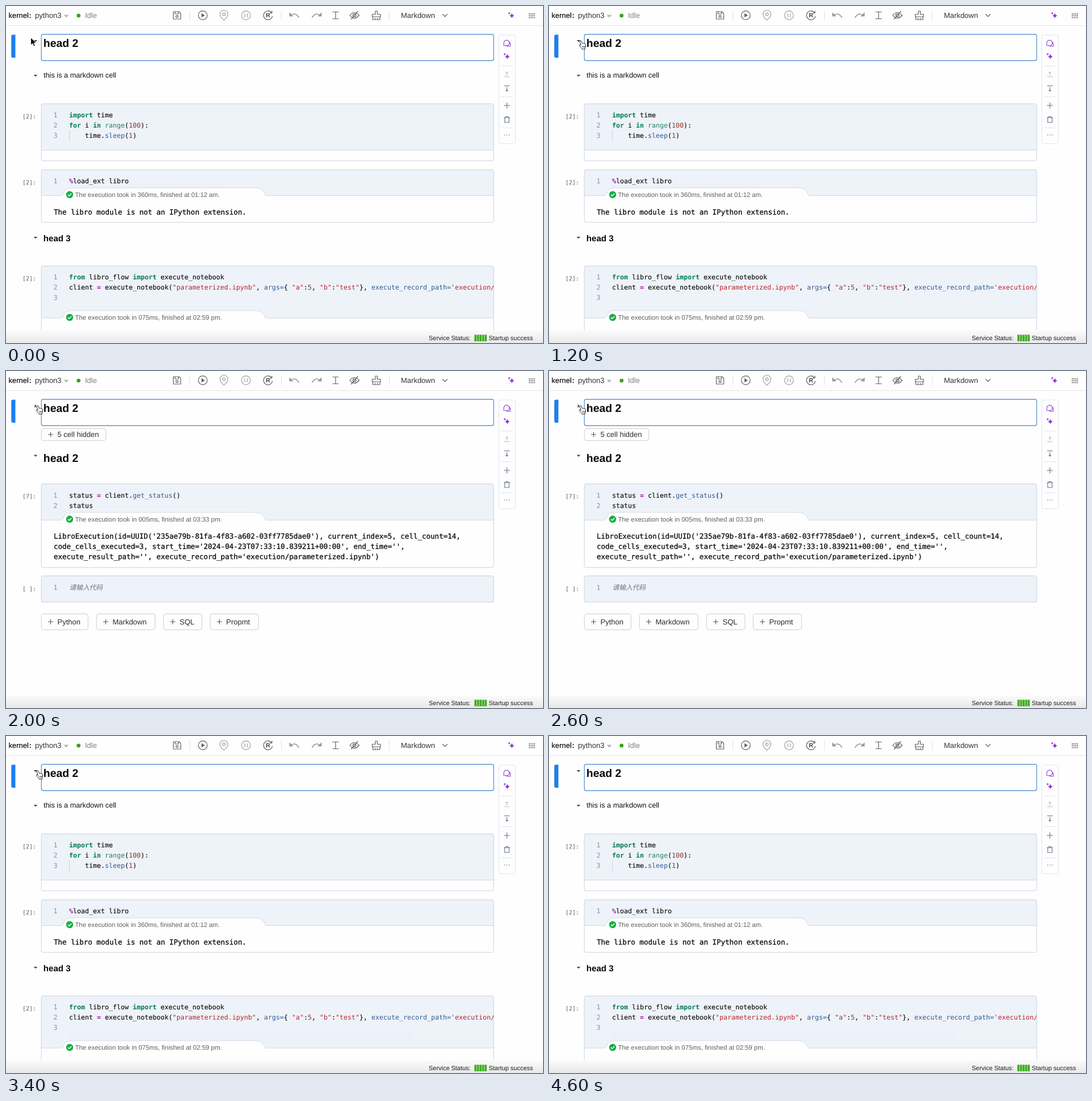
Recreate the animation shown at these times as an HTML page. Size 945x593 px, loop 4.8 s.

```html
<!DOCTYPE html>
<html lang="en">
<head>
<meta charset="utf-8">
<title>Notebook cell folding</title>
<style>
html, body { margin: 0; width: 100%; height: 100%; overflow: hidden; background: #fefefe; }
svg { display: block; width: 945px; height: 593px; }
text {
  white-space: pre; font-family: "Liberation Sans", Arial, sans-serif;
  text-rendering: geometricPrecision;
}
.mono { font-family: "DejaVu Sans Mono", monospace; }
.output { stroke: #0c0c0c; stroke-width: .3; }
.code { stroke: #0c0c0c; stroke-width: .12; }
.code tspan { stroke: none; }
.kw { fill: #007a58; font-weight: bold; }
.builtin { fill: #27806c; }
.num { fill: #8e3528; }
.prop { fill: #2c5f95; }
.op { fill: #a5129f; font-weight: bold; }
.str { fill: #bd2430; }
.icon { fill: none; stroke: #626262; stroke-width: 1.2; stroke-linecap: round; stroke-linejoin: round; }
.dim { stroke: #a0a0a0; }
.side { stroke: #63718c; stroke-width: 1.1; }
.pale { stroke: #b9bec9; }
.chat { stroke: #9138d6; stroke-width: 1.1; }
</style>
</head>
<body>
<svg id="stage" viewBox="0 0 945 593" xmlns="http://www.w3.org/2000/svg"></svg>
<script>
const LOOP = 4800;
const STEP = 200;
const PURPLE = '#9138d6';
const LEFT = 62.2, RIGHT = 858.2;

const text = (x, y, size, str, fill = '#111', extra = '') =>
  `<text x="${x}" y="${y}" font-size="${size}" fill="${fill}" ${extra}>${str}</text>`;
const mono = (x, y, size, str, fill = '#0c0c0c', cls = '') =>
  text(x, y, size, str, fill, `class="mono ${cls}"`);
const path = (d, fill = 'none', extra = '') => `<path d="${d}" fill="${fill}" ${extra}/>`;
const icon = (d, cls = '') => `<path class="icon ${cls}" d="${d}"/>`;
const rect = (x, y, w, h, fill, extra = '') =>
  `<rect x="${x}" y="${y}" width="${w}" height="${h}" fill="${fill}" ${extra}/>`;
const circle = (x, y, r, fill, extra = '') =>
  `<circle cx="${x}" cy="${y}" r="${r}" fill="${fill}" ${extra}/>`;
const span = (cls, str) => `<tspan class="${cls}">${str}</tspan>`;
const kw = s => span('kw', s), op = s => span('op', s), str = s => span('str', s);
const num = s => span('num', s), prop = s => span('prop', s);

const star = (x, y, r) => {
  const k = r * 0.18;
  return path(`M${x} ${y - r}Q${x + k} ${y - k} ${x + r} ${y}Q${x + k} ${y + k} ${x} ${y + r}` +
    `Q${x - k} ${y + k} ${x - r} ${y}Q${x - k} ${y - k} ${x} ${y - r}Z`, PURPLE);
};
const sparkles = (x, y) => star(x + 1.2, y + 1, 4.8) + star(x - 3.4, y - 3.2, 2.4);
const ring = (x, cls = '') => circle(x, 16.4, 7.8, 'none', `class="icon ${cls}"`);
const foldDown = y => path(`M48.8 ${y}h6.4l-3.2 3.4z`, '#4a4a4a');
const foldRight = y => path(`M50.6 ${y - 2}v6.4l3.4-3.2z`, '#4a4a4a');
const label = (y, str) => mono(29, y, 10, str, '#545d6b');
const heading = (y, size, str) => text(65.8, y, size, str, '#080808', 'font-weight="bold"');
const plus = (x, y) => path(`M${x - 4.5} ${y}h9M${x} ${y - 4.5}v9`, 'none', 'stroke="#555" stroke-width="1.1"');

// Numbered code lines, 18px apart.
const code = (y, lines) => lines.map((line, i) =>
  mono(83.5, y + i * 18, 11.63, i + 1, '#8790a0') +
  mono(111, y + i * 18, 11.63, line, '#0c0c0c', 'code')).join('');

// A cell with a shaded input part down to `split`.
const cell = (top, split, bottom) => {
  const frame = [LEFT, top, RIGHT - LEFT, bottom - top];
  return rect(...frame, '#fefefe', 'rx="3"') +
    path(`M${LEFT} ${split}V${top + 3}q0-3 3-3H${RIGHT - 3}q3 0 3 3V${split}z`, '#eef2f9') +
    path(`M${LEFT} ${split}H${RIGHT}`, 'none', 'stroke="#cfd6e3"') +
    rect(...frame, 'none', 'rx="3" stroke="#ccd2df"');
};

const timing = (y, size, str) => {
  const tab = `M98 ${y + 1}q3-2 4-5.5q3-8 12-8H438q12 0 16 8q2 4 3 5.5`;
  return path(tab + 'v1.5H98z', '#fefefe') + path(tab, 'none', 'stroke="#d3d9e5"') +
    circle(112, y - .5, 6.2, '#17ae48') +
    path(`M109 ${y - .5}l2.2 2.3l4-4.3`, 'none', 'stroke="#fff" stroke-width="1.4"') +
    text(121.5, y + 3.2, size, str, '#5f5f5f');
};

const button = (x, y, w, h, str) =>
  rect(x + .3, y + .3, w, h, '#fefefe', 'rx="4" stroke="#cdcdcd"') +
  plus(x + 16.5, y + h / 2 + .3) + text(x + 28.5, y + h / 2 + 4.7, 13, str, '#2c2c2c');

const toolbar = () =>
  path('M0 34.5H945', 'none', 'stroke="#e4e4e4"') +
  text(4.5, 21, 13, 'kernel', '#111', 'stroke="#111" stroke-width=".2"') +
  text(40.5, 21, 13, ':', '#111', 'font-weight="bold"') +
  text(51, 21, 13.1, 'python3', '#333') +
  path('M101.5 15.5h9l-4.5 5z', '#b9b9b9') + circle(127.7, 16.8, 3.4, '#3aa318') +
  text(139, 21, 13, 'Idle', '#808080') +
  [323.5, 484.5, 674.5].map(x => path(`M${x} 8.5v17`, 'none', 'stroke="#e2e2e2"')).join('') +
  icon('M294.5 10h10l3 3v10h-13zM297.5 10v4h6v-4') + circle(301, 18.5, 1.9, 'none', 'class="icon"') +
  ring(346.3) + path('M344 12.8l6 3.6l-6 3.6z', '#626262') +
  icon('M383.5 25q-7-6-7-10.5a7 7 0 0 1 14 0q0 4.5-7 10.5z', 'dim') +
  circle(383.5, 14.5, 2.3, 'none', 'class="icon dim"') +
  ring(422.3, 'dim') + icon('M420.2 13.5v6M424.5 13.5v6', 'dim') +
  icon('M467.5 12a7.8 7.8 0 1 0 1.2 6M468 8.8v3.5h-3.5') +
  text(457.2, 20.3, 10.5, 'R', '#444', 'font-weight="bold"') +
  path('M498.5 11v7.2h7.2z', '#999') + path('M501 16.5q8.500-6.500 14.500 4', 'none', 'stroke="#999" stroke-width="1.7"') +
  path('M555.5 11v7.2h-7.2z', '#999') + path('M553 16.5q-8.500-6.500-14.500 4', 'none', 'stroke="#999" stroke-width="1.7"') +
  icon('M575 10.5h10M575 22.5h10M580 10.5v12') +
  icon('M605 16.5q8-10 16.5 0q-8.5 10-16.5 0zM607.5 23l11.5-13.5') +
  circle(613.2, 16.5, 2.7, 'none', 'class="icon"') +
  icon('M650 14.500V9h3.500v5.500h5.500v4.500h-14.500v-4.500zM645.500 19v5h12.500v-5M649.500 24v-2.500M653.800 24v-2.500') +
  text(695, 21, 13, 'Markdown', '#333') + icon('M768.5 14.5l4 4l4-4') +
  sparkles(889, 16) +
  [0, 1, 2].map(r => [0, 1, 2, 3].map(c =>
    rect(920 + c * 3, 13 + r * 3.3, 1.9, 1.7, '#666')).join('')).join('');

const sidebar = () =>
  rect(867.3, 51, 29.2, 191.3, '#fefefe', 'rx="3" stroke="#e1e4eb"') +
  icon('M876 69.5v-4.500a4.900 4.900 0 1 1 4.900 4.900zM885.800 63.500q2.300 2 1.500 4.500v3h-3.500q-2 0-3.300-1.200', 'chat') +
  sparkles(881, 88) +
  [105.5, 159.5, 214.5].map(y => path(`M871.5 ${y}h20`, 'none', 'stroke="#e1e4eb"')).join('') +
  icon('M877 124.5h9M881.5 122v-6M879.7 117.7l1.8-1.8l1.8 1.8', 'side pale') +
  icon('M877 140.5h9M881.5 143v7M879.7 148.2l1.8 1.8l1.8-1.8', 'side') +
  icon('M876.5 175h10M881.5 170v10', 'side') +
  icon('M876.5 196.5h10M879.5 196.5v-2h4v2M877.7 196.5v8.5h7.6v-8.5', 'side') +
  [877.5, 881.5, 885.5].map(x => circle(x, 227, .8, '#63718c')).join('');

const statusBar = () =>
  rect(0, 571, 945, 22, 'url(#shade)') +
  text(744, 588, 10.95, 'Service Status', '#1c1c1c') + text(814.5, 588, 10.95, ':', '#1c1c1c') +
  [0, 1, 2, 3, 4].map(i => rect(824.3 + i * 4.5, 578.5, 3.7, 11.5, '#3fae1f')).join('') +
  text(849.5, 588, 10.96, 'Startup success', '#1c1c1c');

const activeCell = () =>
  path('M16.500 50.500v40.500h-4.500q-2.700 0-2.700-3V53.500q0-3 2.700-3z', '#1b7ff0') +
  rect(LEFT, 49.9, RIGHT - LEFT, 46.2, '#fefefe', 'rx="3" stroke="#3f82cc" stroke-width="1.1"') +
  heading(72.4, 19.4, 'head 2');

const expanded = () =>
  foldDown(60) + foldDown(121) + text(66, 126, 12.73, 'this is a markdown cell') +
  label(197.7, '[2]:') + cell(172, 253.5, 272.3) +
  path('M111.5 219v19', 'none', 'stroke="#cbd2de"') +
  code(196, [
    kw('import') + ' time',
    `${kw('for')} i ${kw('in')} ${span('builtin', 'range')}(${num('100')}):`,
    `    time.${prop('sleep')}(${num('1')})`
  ]) +
  label(313.5, '[2]:') + cell(288, 333.5, 380.7) +
  code(312, [op('%') + 'load_ext libro']) +
  timing(332.5, 11.25, 'The execution took in 360ms, finished at 01:12 am.') +
  mono(84, 366.8, 12.52, 'The libro module is not an IPython extension.', '#0c0c0c', 'output') +
  foldDown(406) + heading(413.8, 15.1, 'head 3') +
  label(482.7, '[2]:') + cell(457.5, 549, 640) +
  `<g clip-path="url(#codeClip)">` + code(481, [
    `${kw('from')} libro_flow ${kw('import')} execute_notebook`,
    `client ${op('=')} execute_notebook(${str('"parameterized.ipynb"')}, ${prop('args=')}{ ${str('"a"')}:${num('5')}, ` +
      `${str('"b"')}:${str('"test"')}}, ${prop('execute_record_path=')}${str("'execution/")}`,
    ''
  ]) + '</g>' +
  rect(111, 522, 602.5, 10.5, '#b7babd', 'id="scrollbar"') +
  timing(548.5, 11.43, 'The execution took in 075ms, finished at 02:59 pm.');

const collapsed = () =>
  foldRight(60.5) + button(62, 101, 113.5, 21, '5 cell hidden') +
  foldDown(147.5) + heading(159.7, 19.4, 'head 2') +
  label(224, '[7]:') + cell(198.5, 262.3, 345.8) +
  code(223, [`status ${op('=')} client.${prop('get_status')}()`, 'status']) +
  timing(261.3, 11.43, 'The execution took in 005ms, finished at 03:33 pm.') +
  ["LibroExecution(id=UUID('235ae79b-81fa-4f83-a602-03ff7785dae0'), current_index=5, cell_count=14,",
   "code_cells_executed=3, start_time='2024-04-23T07:33:10.839211+00:00', end_time='',",
   "execute_result_path='', execute_record_path='execution/parameterized.ipynb')"
  ].map((line, i) => mono(84, 295.4 + i * 18, 12.52, line, '#0c0c0c', 'output')).join('') +
  label(386.7, '[ ]:') + cell(360.5, 406.5, 406.5) + code(385, ['']) +
  text(111.5, 385, 11.7, '请输入代码', '#6c727c',
    `style="font-family:'Noto Sans CJK SC','Noto Sans CJK',sans-serif;font-style:italic"`) +
  button(62, 427, 82, 28, 'Python') + button(159, 427, 103, 28, 'Markdown') +
  button(277, 427, 67.5, 28, 'SQL') + button(359, 427, 85, 28, 'Propmt');

const arrow = path('M43.5 55.5v13.5l3.2-2.9l2.2 4.9l2.4-1.1l-2.2-4.7l4.4-.2z', '#0a0a0a',
  'stroke="#fff" stroke-width="1"');
const hand = path('M55 61.3q1.3-.8 2 .6l1.6 4.1q1-1 2 0q1.2-.8 2 .4q1.6-.3 1.9 1.5' +
  'q.3 3.6-1 5.600v2.3h-5.600v-1.2q-2.5-2.2-4.5-5.1q-.4-1.5 1-1.5l1.9 1.3l-2.1-6.2q-.2-1.3.8-1.8z' +
  'M59.300 70.500v2.500M61.200 70.500v2.500M63 70.500v2.500', '#fff',
  'stroke="#111" stroke-width=".9" stroke-linejoin="round"');

const stage = document.getElementById('stage');
stage.innerHTML = `<defs>
  <linearGradient id="shade" x1="0" y1="0" x2="0" y2="1">
    <stop offset="0" stop-color="#fbfbfb"/><stop offset="1" stop-color="#e8e8e8"/>
  </linearGradient>
  <clipPath id="codeClip"><rect x="62" y="457" width="796" height="114"/></clipPath>
</defs>` + rect(0, 0, 945, 593, '#fefefe') + toolbar() + activeCell() + sidebar() +
  `<g id="expanded">${expanded()}</g><g id="collapsed">${collapsed()}</g>` + statusBar() +
  `<g id="arrow">${arrow}</g><g id="hand">${hand}</g>`;

const parts = Object.fromEntries(
  ['expanded', 'collapsed', 'arrow', 'hand', 'scrollbar'].map(id => [id, document.getElementById(id)]));
const show = (el, on) => el.setAttribute('display', on ? 'inline' : 'none');

// The overlay scrollbar flashes after the cells unfold.
const scrollOpacity = t =>
  t < 3400 ? 0 : t < 3600 ? .04 : t < 4400 ? 1 : t < 4600 ? .65 : .04;

function render(time) {
  const t = Math.floor((time % LOOP) / STEP) * STEP;
  const folded = t >= 1400 && t < 3400;
  show(parts.expanded, !folded);
  show(parts.collapsed, folded);
  show(parts.arrow, t < 200);
  show(parts.hand, t >= 200 && t < 3800);
  parts.scrollbar.setAttribute('opacity', scrollOpacity(t));
}

const start = performance.now();
function tick() {
  render(performance.now() - start);
  requestAnimationFrame(tick);
}
tick();
</script>
</body>
</html>
```
